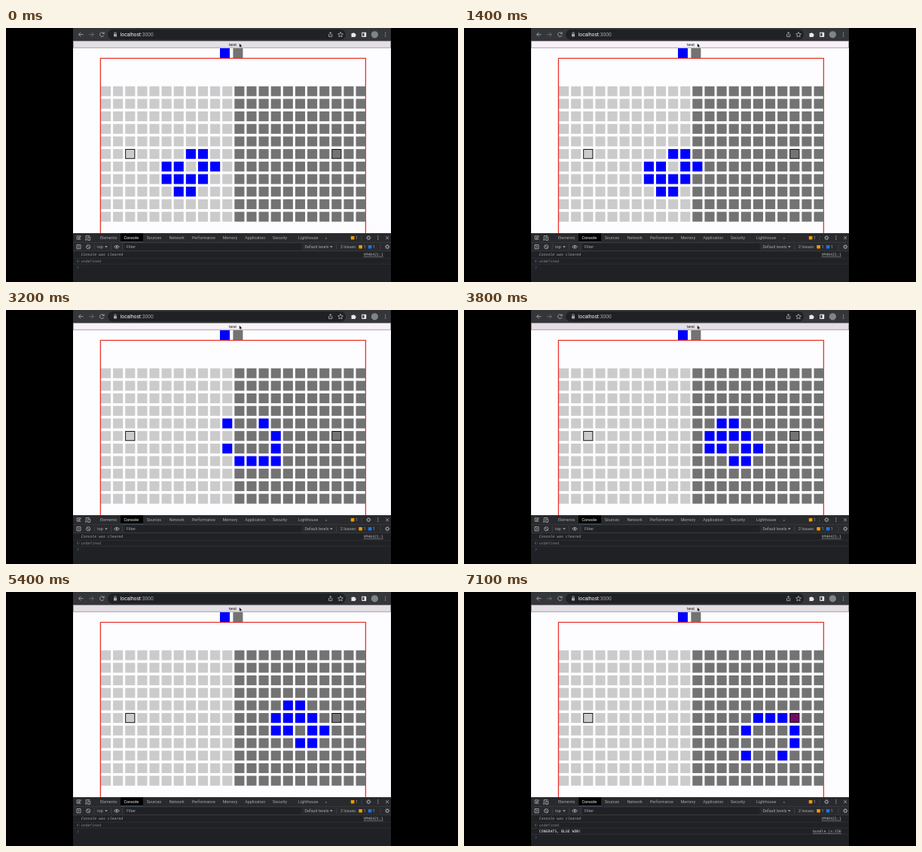
Recreate the animation shown at these times as an HTML page. Size 600 px wide and 338 px high, loop 7500 ms.

```html
<!DOCTYPE html>
<html lang="en">
<head>
<meta charset="utf-8">
<title>Life board</title>
<style>
html, body { margin: 0; width: 100%; height: 100%; overflow: hidden; background: #000; }
svg { display: block; width: 100vw; height: 100vh; }
text { font: 5.35px Roboto, Arial, sans-serif; fill: #a3a7ac; white-space: pre; }
.mono text { font: 4.85px "DejaVu Sans Mono", monospace; }
.icon { fill: none; stroke: #a3a7ac; stroke-width: .9; }
.dim { stroke: #6f7276; }
.bright { fill: #f1f3f4; }
.link { text-anchor: end; text-decoration: underline; fill: #b4b7bb; }
</style>
</head>
<body>
<svg viewBox="0 0 600 338">
  <defs>
    <g id="gear">
      <circle r="1.8" fill="none" stroke="#a3a7ac" stroke-width="1"/>
      <circle r="2.6" fill="none" stroke="#a3a7ac" stroke-width=".9" stroke-dasharray="1.02"/>
    </g>
    <g id="dots" fill="#a3a7ac"><circle cy="-2.2" r=".65"/><circle r=".65"/><circle cy="2.2" r=".65"/></g>
  </defs>
  <rect width="600" height="338"/>

  <!-- browser bar -->
  <rect x="89" width="422" height="17.5" fill="#35363a"/>
  <rect x="135" y="2" width="316" height="13.4" rx="6.7" fill="#202124"/>
  <g class="icon">
    <path d="M102.5 8.7H96.6M99.2 6L96.5 8.7 99.2 11.4"/>
    <path class="dim" d="M110.3 8.7H116.2M113.6 6L116.3 8.7 113.6 11.4"/>
    <path d="M129.8 7.2A2.8 2.8 0 1 0 130 9.7M130.2 5.5V7.6H128"/>
    <path d="M428.6 8V11.6H432.8V8M430.7 9.7V5.4M429.2 6.8L430.7 5.3 432.2 6.8"/>
    <path d="M444 5.4L445 7.7 447.4 7.9 445.6 9.5 446.1 11.9 444 10.6 441.9 11.9 442.4 9.5 440.6 7.9 443 7.7Z"/>
  </g>
  <rect x="143" y="8" width="4" height="3.6" rx=".5" fill="#a3a7ac"/>
  <path class="icon" d="M143.8 8V6.9A1.2 1.2 0 0 1 146.2 6.9V8"/>
  <text x="151.7" y="11" style="font-size:6.7px"><tspan class="bright">localhost</tspan>:3000</text>
  <path d="M458.5 7H460A1.2 1.2 0 0 1 462.3 7H463.7V8.4A1.1 1.1 0 0 1 463.7 10.6V12H458.5Z" fill="#e8eaed"/>
  <rect x="472.2" y="5.7" width="6" height="6.2" rx=".7" fill="#e8eaed"/>
  <rect x="473.2" y="6.8" width="2.3" height="4" fill="#35363a"/>
  <circle cx="489.4" cy="8.8" r="4.6" fill="#7e8587"/>
  <use href="#dots" x="503.6" y="8.8"/>

  <!-- page -->
  <rect x="89" y="17" width="422" height="256.5" fill="#fdfcfe"/>
  <rect id="button" x="89.3" y="17.4" width="421.4" height="8.8" stroke="#858087" stroke-width=".7"/>
  <text x="301" y="24" text-anchor="middle" style="font:6.1px 'Liberation Sans',sans-serif;fill:#111">test</text>
  <rect x="284" y="27" width="13" height="13" fill="#00f"/>
  <rect x="301.4" y="27" width="13" height="13" fill="#737373"/>
  <path d="M125.4 273.5V40.3H477.4V273.5" fill="none" stroke="#e8342e" stroke-width="1.3"/>
  <g id="board"></g>
  <path d="M309.8 20.4V25.7L311 24.6 311.8 26.3 312.6 25.9 311.8 24.3H313.5Z" stroke="#fff" stroke-width=".25"/>

  <!-- developer tools -->
  <rect x="89" y="273.2" width="422" height="64.8" fill="#202124"/>
  <rect x="89" y="273.2" width="422" height="12.2" fill="#292a2d"/>
  <rect x="152" y="273.2" width="30" height="12" fill="#000"/>
  <path d="M152 285H182" stroke="#7aa5e8" stroke-width=".8"/>
  <rect x="89" y="285.4" width="422" height="11.4" fill="#292a2d"/>
  <rect x="157.5" y="286.6" width="235" height="9" fill="#202124"/>
  <path d="M89 285.4H511M89 296.8H511" stroke="#45474b" stroke-width=".6"/>
  <g class="icon">
    <path d="M98 281.2H94.2V276.8H99V278.5M96.4 278.7L99.4 281.9M96.4 280.7V278.7H98.5"/>
    <path d="M106.2 281.8V276.6H111.2M108.8 278.3H111.7V282.4H108.8ZM105 282H107.6"/>
    <path d="M94 288.5H99V293.8H94ZM95.6 289.8L97.3 291.1 95.6 292.5"/>
    <circle cx="109.2" cy="291.2" r="2.6"/><path d="M107.4 289.4L111 293"/>
    <path d="M143.6 291.2Q147 287.3 150.4 291.2Q147 295.1 143.6 291.2Z"/>
    <path d="M504.2 277.4L508 281.2M508 277.4L504.2 281.2"/>
  </g>
  <circle cx="147" cy="291.2" r="1.1" fill="#a3a7ac"/>
  <path d="M117.3 287.5V295M139.7 287.5V295M154.3 287.5V295M438.5 287.5V295M497 287.5V295M472 276V283" stroke="#505257" stroke-width=".5"/>
  <g id="tabs"></g>
  <text x="121" y="293.1">top</text>
  <path d="M131.2 290.3H134.8L133 292.6ZM430 290.3H433.6L431.8 292.6Z" fill="#a3a7ac"/>
  <text x="160" y="293.1">Filter</text>
  <text x="396.5" y="293.1">Default levels</text>
  <text x="444" y="293.1" fill="#ddd">2 Issues:</text>
  <rect x="457.8" y="277" width="4.6" height="4.4" rx=".6" fill="#f29900"/>
  <rect x="468.3" y="289" width="4.6" height="4.4" rx=".6" fill="#f29900"/>
  <rect x="480.8" y="289" width="4.6" height="4.4" rx=".6" fill="#1a73e8"/>
  <text x="464" y="281.2">1</text><text x="474.4" y="293.1">1</text><text x="486.8" y="293.1">1</text>
  <use href="#gear" x="481.3" y="279.2"/>
  <use href="#gear" x="506.2" y="291.2"/>
  <use href="#dots" x="493.8" y="279.2"/>
  <path d="M89 306.4H511M89 314.2H511" stroke="#3a3c40" stroke-width=".5"/>
  <g class="mono">
    <text x="99.8" y="303.4" style="font-style:italic">Console was cleared</text>
    <text class="link" x="500.8" y="303.4">VM40421:1</text>
    <path class="icon dim" d="M96 308.5L94.2 310.2 96 311.9M97 310.2H97.8"/>
    <text x="99.8" y="311.9" style="fill:#80868b">undefined</text>
    <g id="log">
      <text class="bright" x="99.8" y="320">CONGRATS, BLUE WON!</text>
      <text class="link" x="500.8" y="320">bundle.js:156</text>
      <path d="M89 322.3H511" stroke="#3a3c40" stroke-width=".5"/>
    </g>
    <path id="prompt" d="M94.6 316.8L96.3 318.5 94.6 320.2" fill="none" stroke="#3565bd" stroke-width=".9"/>
  </g>
</svg>
<script>
const LOOP = 7500, COLS = 22, ROWS = 11;
const START = [2, 5], GOAL = [19, 5];
// Times at which the board advances, and spans during which the button is held.
const STEPS = [200, 500, 900, 1200, 1600, 1800, 2100, 2300, 2600, 2800, 3100,
  3300, 3500, 3800, 4000, 4300, 4600, 5200, 5800, 6400, 7000];
const HOLDS = [[100, 200], [400, 500], [700, 900], [1000, 1200], [1400, 1600],
  [1700, 1800], [2000, 2100], [2200, 2300], [2500, 2600], [2700, 2800], [3000, 3100],
  [3200, 3300], [3400, 3500], [3700, 3800], [3900, 4300], [4400, 4600],
  [5000, 5200], [5600, 5800], [6200, 6400], [6800, 7000]];
const byId = id => document.getElementById(id);

function add(parent, tag, attrs) {
  const node = document.createElementNS("http://www.w3.org/2000/svg", tag);
  for (const name in attrs) node.setAttribute(name, attrs[name]);
  return parent.appendChild(node);
}

const tabs = { Elements: 125, Console: 156.6, Sources: 186.7, Network: 216.7, Performance: 247,
  Memory: 287.7, Application: 317.3, Security: 354, Lighthouse: 388, "»": 423.5 };
for (const name in tabs) {
  add(byId("tabs"), "text", { x: tabs[name], y: 281.2, class: name === "Console" ? "bright" : "" }).textContent = name;
}

const is = (x, y, [cx, cy]) => x === cx && y === cy;
const cells = [];
for (let y = 0; y < ROWS; y++) for (let x = 0; x < COLS; x++) {
  const marked = is(x, y, START) || is(x, y, GOAL), inset = marked ? .45 : 0;
  const size = 13.1 - 2 * inset;
  const node = add(byId("board"), "rect", {
    x: 126 + x * 16.12 + inset, y: 77.6 + y * 16.7 + inset,
    width: size, height: size, stroke: marked ? "#000" : "none", "stroke-width": .9
  });
  cells.push({ node, x, y, idle: x < COLS / 2 ? "#cbcbcb" : "#737373",
    live: is(x, y, GOAL) ? "#6f0a66" : "#00f" });
}

function nextBoard(board) {
  const alive = (x, y) => x >= 0 && x < COLS && y >= 0 && y < ROWS && board[y * COLS + x] ? 1 : 0;
  return cells.map(({ x, y }) => {
    let sum = -alive(x, y);
    for (let dy = -1; dy <= 1; dy++) for (let dx = -1; dx <= 1; dx++) sum += alive(x + dx, y + dy);
    return sum === 3 || (sum === 2 && alive(x, y) === 1);
  });
}

const ship = ["..##.", "##.##", "####.", ".##.."];
const boards = [cells.map(({ x, y }) => ship[y - 5]?.[x - 5] === "#")];
for (const _ of STEPS) boards.push(nextBoard(boards.at(-1)));

let shown = -1;
function draw(now) {
  const t = now % LOOP;
  const step = STEPS.filter(time => time <= t).length;
  const held = HOLDS.some(([from, to]) => t >= from && t < to);
  byId("button").setAttribute("fill", held ? "#f8f2f8" : "#e4dee5");
  if (step !== shown) {
    shown = step;
    cells.forEach((cell, i) => cell.node.setAttribute("fill", boards[step][i] ? cell.live : cell.idle));
    const won = step === STEPS.length;
    byId("log").setAttribute("visibility", won ? "visible" : "hidden");
    byId("prompt").setAttribute("transform", `translate(0 ${won ? 8 : 0})`);
  }
  requestAnimationFrame(draw);
}
draw(performance.now());
</script>
</body>
</html>
```
